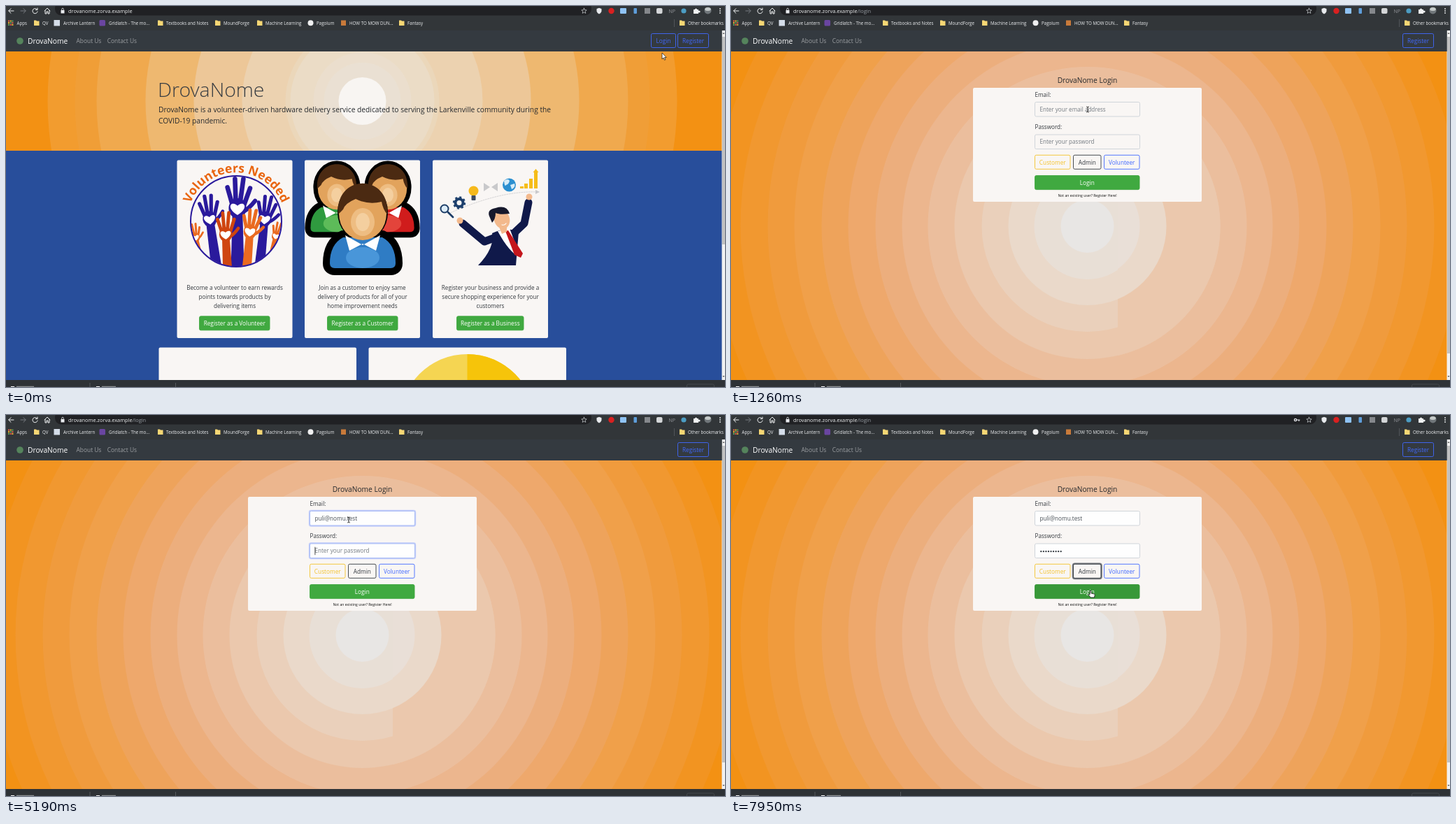
Recreate the animation shown at these times as an HTML page. Size 1028 px wide and 545 px high, loop 8000 ms.

```html
<!DOCTYPE html>
<html lang="en">
<head>
<meta charset="utf-8">
<title>DrovaNome login</title>
<style>
html, body { margin: 0; height: 100%; overflow: hidden; background: #343a40; }
svg { display: block; width: 100vw; height: 100vh; font-family: "Open Sans", "Noto Sans", sans-serif; }
text { white-space: pre; }
</style>
</head>
<body>
<svg id="stage" viewBox="0 0 1028 545"></svg>
<script>
const GREEN = '#40a940', BLUE = '#4169ff', DARK = '#343a40', PAPER = '#f9f6f4', GOLD = '#f3c22b';
const BRAND = 'DrovaNome', HOST = 'drovanome.zorva.example', EMAIL = 'puli@nomu.test';

// Shape helpers
const rect = (x, y, w, h, fill, more = '') => `<rect x="${x}" y="${y}" width="${w}" height="${h}" fill="${fill}" ${more}/>`;
const disc = (x, y, r, fill, more = '') => `<circle cx="${x}" cy="${y}" r="${r}" fill="${fill}" ${more}/>`;
const oval = (x, y, rx, ry, fill, more = '') => `<ellipse cx="${x}" cy="${y}" rx="${rx}" ry="${ry}" fill="${fill}" ${more}/>`;
const path = (d, fill, more = '') => `<path d="${d}" fill="${fill}" ${more}/>`;
const line = (d, color, w = 1, more = '') => path(d, 'none', `stroke="${color}" stroke-width="${w}" stroke-linecap="round" stroke-linejoin="round" ${more}`);
const text = (x, y, s, size, fill, more = '') => `<text x="${x}" y="${y}" font-size="${size}" fill="${fill}" ${more}>${s}</text>`;
const mid = (x, y, s, size, fill, more = '') => text(x, y, s, size, fill, 'text-anchor="middle" ' + more);
const group = (s, more) => `<g ${more}>${s}</g>`;

// Outlined button; fill runs from 0 (outline only) to 1
function button(x, y, w, label, color, fill = 0) {
  return rect(x, y, w, 20, color, `rx="2" stroke="${color}" stroke-width=".9" fill-opacity="${fill}"`) +
    mid(x + w / 2, y + 13.3, label, 8.25, fill > .4 ? '#fff' : color);
}

const rings = (x, y, list) => list.map(([r, c, o = 1]) => disc(x, y, r, c, `opacity="${o}"`)).join('');
const folder = x => path(`M${x} 20.5h3l1 1h3.5v6.5h-7.5z`, '#f7d774');

function toolbar() {
  let s = rect(0, 0, 1028, 35, '#323639') + rect(70, -6, 767, 19.5, '#202124', 'rx="9"');
  s += line('M11 7H4m3-3.3L3.7 7 7 10.3', '#f1f3f4') + line('M21 7h7m-3-3.3L28.3 7 25 10.3', '#777b80');
  s += line('M44.5 5a3.6 3.6 0 1 0 .6 3M45 3v2.5h-2.5', '#f1f3f4') + line('M55 7l4-4 4 4M56 6.5V11h2V8h2v3h2V6.5', '#f1f3f4');
  s += rect(78.5, 6, 5, 4.5, '#e8eaed') + line('M79.7 6V4.5a1.3 1.3 0 0 1 2.6 0V6', '#e8eaed', .8);
  s += line('M826.5 3.2l1.1 2.5 2.6.2-2 1.8.6 2.7-2.3-1.4-2.3 1.4.6-2.7-2-1.8 2.6-.2z', '#d5d8db', .7);
  s += path('M844.5 4l3.5-1.3L851.5 4v3.5q-.5 2.5-3.5 4-3-1.5-3.5-4z', '#e8eaed');
  s += disc(865.5, 7, 4.2, '#d92020') + rect(878, 3, 9, 8, '#8fc3f5', 'rx="1"') + rect(897.5, 3, 4.5, 8, '#5e9edb', 'rx="1"');
  s += rect(913, 3, 8, 8, '#85888c') + rect(930, 3, 8.5, 8, '#d4d6d8', 'rx="2"') + text(947.5, 10, 'NP', 7, '#93969a');
  s += disc(969, 7, 3.6, '#4c9dc4') + path('M983 5h2a1.5 1.5 0 1 1 3 0h2v2a1.5 1.5 0 1 1 0 2v2h-7z', '#f1f3f4');
  s += disc(1003.5, 6.5, 5, '#70767a') + oval(1003.5, 4.5, 4.3, 2.5, '#c5cac9');
  for (const y of [4, 7, 10]) s += disc(1021, y, .9, '#f1f3f4');
  return s;
}

function bookmarks() {
  const marks = [[15.5, 'Apps'], [52, 'QV', 1], [82, 'Archive Lantern'], [147, 'Gridlatch - The mo...'],
    [229, 'Textbooks and Notes', 1], [311, 'MoundForge', 1], [371, 'Machine Learning', 1],
    [444, 'Pagolum'], [491, 'HOW TO MOW DUN...'], [574, 'Fantasy', 1], [975, 'Other bookmarks', 1]];
  let s = '';
  for (let i = 0; i < 9; i++) {
    const row = Math.floor(i / 3);
    s += rect(3 + i % 3 * 2.7, 20.5 + row * 2.7, 2, 2, ['#e85b4d', '#f2b72e', '#5aa65e'][(i + row) % 3]);
  }
  s += rect(68.5, 20, 8.5, 8.5, '#d5dde8') + rect(133.5, 20, 8.5, 8.5, '#6a45a0', 'rx="1.5"');
  s += disc(435.5, 24.3, 4, '#f0f0f0') + rect(479, 20.5, 7, 7.5, '#c97a3a') + rect(955, 19, .7, 11, '#5f6368');
  for (const [x, label, hasFolder] of marks) s += text(x, 26.5, label, 6.2, '#eceef0') + (hasFolder ? folder(x - 12) : '');
  return s;
}

function siteBar() {
  return rect(0, 35, 1023.5, 30, DARK) + disc(20, 50, 4.8, '#55845c') +
    text(31, 53.6, BRAND, 10.2, '#fff', 'font-weight="500"') + text(100.5, 53.2, 'About Us', 8.4, '#9b9ea1') +
    text(144.7, 53.2, 'Contact Us', 8.4, '#9b9ea1') + button(960.5, 39.5, 44, 'Register', BLUE);
}

function shelf() {
  return rect(0, 535, 1028, 10, '#2e3236') + rect(119.5, 539, 1, 6, '#55595d') + rect(242, 539, 1, 6, '#55595d') +
    path('M7 545v-1h5v1zM129 545v-1h5v1z', '#fff') + rect(15, 543.8, 25, 1.2, '#8b8f93') + rect(137, 543.8, 20, 1.2, '#8b8f93') +
    rect(973.5, 541, 39, 9, 'none', 'rx="2" stroke="#44484c"');
}

function scrollbar(end) {
  return rect(1023.5, 35, 4.5, 500, '#f1f1f1') + rect(1024, 44, 4, end - 44, '#c1c1c1') +
    path('M1024.5 40l1.5-2 1.5 2zM1024.5 529l1.5 2 1.5-2z', '#555');
}

function hand(x, y, k, tilt, color) {
  const s = path('M-6 4H6L8 80H-8z', color) + oval(0, 2, 10.5, 12, color) +
    line('M-6 -2L-12 -23M-2 -4L-3 -33M3 -4L7 -33M7 0L15 -22', color, 5.5) + line('M7 6Q14 2 21 -7', color, 5) +
    path('M0 10C-15 1-7-8 0-1 7-8 15 1 0 10z', '#fff');
  return group(s, `transform="translate(${x} ${y}) rotate(${tilt}) scale(${k})"`);
}

function volunteers() {
  const navy = '#2a1a9c', red = '#cf4510', orange = '#ea6a20';
  const hands = [[271, 330, .55, -12, orange], [386, 328, .55, 12, orange], [291, 303, .95, -8, navy], [370, 303, .92, 6, navy],
    [331, 287, 1.2, 0, navy], [314, 325, .88, -3, red], [349, 321, .88, 5, orange]];
  return `<clipPath id="round"><circle cx="329" cy="308" r="64.5"/></clipPath><path id="arc" d="M259 317A70.5 70.5 0 1 1 399 317" fill="none"/>` +
    group(hands.map(h => hand(...h)).join(''), 'clip-path="url(#round)"') +
    disc(329, 308, 65, 'none', `stroke="${navy}" stroke-width="2"`) +
    `<text font-size="17.5" font-weight="700" fill="#e9650f" text-anchor="middle"><textPath href="#arc" startOffset="50%">Volunteers Needed</textPath></text>`;
}

// Bust in local units; rim is the width of the black band around the head
function bust(x, y, k, rim, color, light) {
  const body = 'M-47 72Q-47 45-28 35H28Q47 45 47 72Q47 79 40 79H-40Q-47 79-47 72z';
  const edge = w => `stroke="#000" stroke-width="${2 * w}" stroke-linejoin="round"`;
  const s = path(body, '#000', edge(10)) + oval(0, -1, 35, 40, '#000', edge(rim)) +
    path(body, color) + oval(0, 64, 24, 15, light, 'opacity=".6"') +
    path('M-25 32L0 46 25 32 19 54 0 44-19 54z', '#fff') + oval(0, 1, 34, 38, '#e2a35c') +
    oval(0, 13, 17, 20, '#eebd82') + oval(0, 13, 10, 13, '#f4cf9f') +
    path('M-35 2C-40-57 40-57 35 2Q29-5 27-16Q8-11-10-20Q-25-14-28-5z', '#4b2a12');
  return group(s, `transform="translate(${x} ${y}) scale(${k})"`);
}

function customers() {
  return '<clipPath id="photo"><path d="M427 220h165v165h-165z"/></clipPath>' +
    group(bust(473, 260, .8, 7, '#2f9a3f', '#7cd36c') + bust(546, 260, .8, 7, '#d01c1c', '#f06050') +
      bust(510, 296, 1, 1, '#2f7cc4', '#5aa8e8'), 'clip-path="url(#photo)"');
}

function business() {
  const suit = '#10194a', skin = '#f3b98c';
  let s = line('M633 297Q705 264 760 266', '#c9c9cc', .8, 'stroke-dasharray="2 1.5"') + path('M757 263l6 3-6 3z', '#c9c9cc');
  s += disc(627, 290, 5.5, '#dcecf8', 'stroke="#1c3c66" stroke-width="2"') + line('M632 295l7 7', '#1c3c66', 2.8);
  s += disc(648, 281.5, 5.5, 'none', 'stroke="#1d3f6c" stroke-width="4"') + disc(648, 281.5, 8, 'none', 'stroke="#1d3f6c" stroke-width="2.4" stroke-dasharray="3 3.28"');
  s += disc(668.5, 264.5, 7, '#f6b91c') + rect(665.5, 271, 6, 7, '#3b4961', 'rx="1"');
  s += path('M683 253l9 6-9 6zM703 253l-9 6 9 6z', '#c9c9cb');
  s += disc(719.5, 256, 9.5, '#2b8fd0') + path('M712 250q6-4 8 0-1 5-5 6-2 4-3-6zM721 256l6-2q2 5-4 8z', '#d6ecf8');
  for (const [x, h] of [[735, 3], [741, 7], [748, 14], [755, 24]]) s += rect(x, 261 - h, 5, h, '#f5bd18');
  s += path('M753.5 238l4-5 4 5z', '#f5bd18');
  s += line('M716 325L684 337 653 311', suit, 11, 'stroke-linecap="butt"') + line('M724 327L741 311 747 281', suit, 11);
  s += disc(649, 307, 4.5, skin) + disc(748, 273, 4.5, skin);
  s += path('M695 325Q715 315 733 323L729 371H675Q699 346 695 325z', suit) + path('M703 322l17-4 16 43q-17-9-33-39z', '#fff');
  s += path('M714 322l4-1 21 33-3 6-9-4z', '#c4161c');
  s += path('M703 311h13v12l-7 3z', skin) + oval(709, 305, 11, 14, skin, 'transform="rotate(-18 709 305)"');
  s += path('M692 303Q686 291 700 289Q716 284 720 297Q706 299 700 296Q700 305 695 310z', '#16182c') + line('M709 313q4 1 6-2', '#fff', 1.2);
  return s;
}

function home() {
  const cards = [
    [244.5, volunteers, 276.5, 100.5, 'Volunteer', ['Become a volunteer to earn rewards', 'points towards products by', 'delivering items']],
    [427, customers, 459.5, 100.5, 'Customer', ['Join as a customer to enjoy same', 'delivery of products for all of your', 'home improvement needs']],
    [610, business, 644.5, 95.5, 'Business', ['Register your business and provide a', 'secure shopping experience for your', 'customers']]];
  let s = rect(0, 65, 1024, 142, '#f39113') + '<clipPath id="hero"><path d="M0 65h1024v142H0z"/></clipPath>';
  s += group(rings(509.5, 136, [[450, '#f29c2f'], [411, '#f1a03c', .6], [380, '#f0a94e'], [310, '#eeb870'],
    [241, '#edc798'], [172, '#ecd2b0'], [110, '#ebdac2', .6], [103, '#ebdcc6'], [70, '#ebe0d0', .7], [55, '#eae3d7', .6], [34, '#f8f5f2']]), 'clip-path="url(#hero)"');
  s += text(217, 130, BRAND, 28.4, '#383d42', 'font-weight="300"');
  s += text(218, 152.4, BRAND + ' is a volunteer-driven hardware delivery service dedicated to serving the Larkenville community during the', 10.22, '#25292d');
  s += text(218, 168.4, 'COVID-19 pandemic.', 10.22, '#25292d') + rect(0, 207, 1024, 328, '#284e9b');
  for (const [x, art, bx, bw, kind, lines] of cards) {
    s += rect(x, 220.5, 165, 254.5, PAPER, 'rx="2"') + art();
    lines.forEach((l, i) => s += mid(x + 82.5, 405.5 + 13 * i, l, 8.15, '#33383d'));
    s += button(bx, 443.8, bw, 'Register as a ' + kind, GREEN, 1);
  }
  s += rect(218.5, 488.5, 282.5, 60, PAPER, 'rx="2"') + rect(518.5, 488.5, 282.5, 60, PAPER, 'rx="2"');
  return s + disc(659.5, 594.5, 96.5, '#f5d552') + path('M659.5 498a96.5 96.5 0 0 1 0 193z', '#f6c40a') + scrollbar(341);
}

const coarse = [[496, '#f19830'], [419, '#f0a04a'], [342, '#eea86c'], [265, '#ecb68e'], [190, '#ebc8ad'], [113, '#ead9ca'], [38, '#e8e6e4']];
const soft = [[427, '#f0a04a', .5], [388, '#eea86c', .4], [196, '#ebc8ad', .4], [55, '#e8e1dc', .7]];
const byRadius = list => list.sort((a, b) => b[0] - a[0]);

// Early backdrop has wide bands; the settled one adds a half-tone band between each pair
function backdrop(settled) {
  const base = rect(0, 65, 1024, 470, '#f39113');
  if (!settled) return base + rings(509.5, 315, byRadius([...coarse, ...soft]));
  const fine = coarse.flatMap(([r, c]) => [[r + 38, c, .5], [r, c]]);
  return base + rings(509.5, 315, fine) + '<clipPath id="side"><path d="M553 65h471v470H553z"/></clipPath>' +
    group(rings(509.5, 315, [...coarse.slice(4, 6), [75, '#e9dfd7']]), 'clip-path="url(#side)"');
}

function form() {
  return rect(346, 117, 327, 163, PAPER, 'rx="2"') + mid(509.5, 110, BRAND + ' Login', 10.2, '#25292d', 'font-weight="500"') +
    text(434.5, 129.8, 'Email:', 8.15, '#33383d') + text(434.5, 176.2, 'Password:', 8.15, '#33383d') +
    mid(509.5, 273.2, 'Not an existing user? Register Here!', 5.1, '#111') + scrollbar(497);
}

// Time-driven parts
const emailKeys = [2280, 2570, 2830, 3140, 3540, 3670, 3810, 3940, 4080, 4210, 4350, 4480, 4630, 4630];
const passKeys = [5460, 5600, 5740, 5880, 6040, 6310, 6450, 6590, 6590];
const moves = [[0, 'arrow', 938, 67], [150, 'hand', 941, 58], [280, 'hand', 942, 54], [560, 'arrow', 941.5, 53.5],
  [700, 'arrow', 932, 59], [840, 'arrow', 860, 85], [980, 'arrow', 720, 120], [1120, 'arrow', 590, 142],
  [1260, 'beam', 510, 148], [1400, 'beam', 490, 150], [7020, 'arrow', 499, 172], [7160, 'hand', 511, 215],
  [7290, 'hand', 518, 223], [7690, 'arrow', 517, 238], [7820, 'hand', 514, 249], [7950, 'hand', 514, 251]];
const shapes = {
  arrow: path('M0 0v9l2-1.9 1.5 3.2 1.4-.6-1.5-3.1h2.8z', '#fff', 'stroke="#111" stroke-width=".7"'),
  hand: path('M-.9.5q.9-1.2 1.8 0v3.5l4.4 1q1 .3.9 1.5l-.7 3.5H0L-3 6q0-1.4 2.1-.2z', '#fff', 'stroke="#111" stroke-width=".8"'),
  beam: line('M-1.5-4Q0-4 0-3V3Q0 4 1.5 4M1.5-4Q0-4 0-3M0 3Q0 4-1.5 4', '#111', .8)
};
const pen = document.createElement('canvas').getContext('2d');
const typed = (keys, t) => keys.filter(k => k <= t).length;
// Half way at a, complete at b
const fade = (t, a, b) => t < a ? 0 : t < b ? .5 : 1;

function field(y, value, hint, focus, caret, width) {
  const glow = focus ? rect(433.7, y - .8, 151.6, 22.1, 'none', `rx="2.5" stroke="#8aa4ff" stroke-width="1.8" opacity="${focus}"`) : '';
  return glow + rect(434.5, y, 150, 20.5, value || focus ? '#fefefe' : PAPER, `rx="2" stroke="${focus ? '#a9bcf5' : '#d0d5da'}"`) +
    (value || text(441.5, y + 13.4, hint, 8.1, '#737a81')) +
    (caret ? rect(441.5 + width, y + 4.7, .8, 11.5, '#222') : '');
}

function loginState(t) {
  const n = typed(emailKeys, t), m = typed(passKeys, t), mail = EMAIL.slice(0, n);
  pen.font = '8.2px "Open Sans", "Noto Sans", sans-serif';
  const mailFocus = fade(t, 1400, 1540) - fade(t, 5190, 5320);
  const passFocus = fade(t, 5190, 5320) - fade(t, 7560, 7690);
  const adminFill = fade(t, 7160, 7290) - fade(t, 7690, 7820);
  let dots = '';
  for (let i = 0; i < m; i++) dots += disc(443.3 + 3.55 * i, 195.2, 1.15, '#333a40');
  let s = field(137.5, n && text(441.5, 150.9, mail, 8.2, '#495057'), 'Enter your email address', mailFocus,
    t >= 1540 && t < 5190 && (t < 2010 || t >= 2280), pen.measureText(mail).width);
  s += field(184, dots, 'Enter your password', passFocus, t >= 5190 && t < 7020, m * 3.55);
  s += button(434.5, 213.3, 50.5, 'Customer', GOLD);
  if (t >= 7560) s += rect(488.7, 212.4, 41.1, 21.8, 'none', 'rx="3" stroke="#777b80" stroke-width="2"');
  s += button(489.5, 213.3, 39.5, 'Admin', DARK, adminFill) + button(533.5, 213.3, 50.5, 'Volunteer', BLUE);
  s += button(434.5, 242.6, 149.5, 'Login', t < 7820 ? GREEN : t < 7950 ? '#3ca13c' : '#389838', 1);
  if (t < 840) s += group(rect(-2, 524, 119, 11, '#35363a', 'rx="1.5" opacity=".75"') +
    text(-2.5, 532, `https://${HOST}/login`, 6.4, '#d5d5d5'), `opacity="${1 - fade(t, 700, 840)}"`);
  if (t >= 5320) s += disc(807, 7, 1.6, 'none', 'stroke="#e8eaed" stroke-width="1.3"') + line('M809 7h4M812 7v1.5', '#e8eaed', 1.2);
  return s;
}

function live(t) {
  const [, kind, x, y] = moves.filter(m => m[0] <= t).pop();
  const page = t < 560 ? button(922.5, 39.5, 35, 'Login', BLUE, fade(t, 150, 280)) : loginState(t);
  return text(89, 9.6, HOST + (t < 560 ? '' : '<tspan fill="#9aa0a6">/login</tspan>'), 7.4, '#f1f3f4') + page +
    group(shapes[kind], `transform="translate(${x} ${y})"`);
}

const part = id => document.getElementById(id);
const show = (id, on) => part(id).style.display = on ? '' : 'none';
part('stage').innerHTML = group(home(), 'id="home"') + group(backdrop(false), 'id="early"') + group(backdrop(true), 'id="late"') +
  group(form(), 'id="form"') + toolbar() + bookmarks() + siteBar() + shelf() + '<g id="live"></g>';
let start, last;

function frame(now) {
  start ??= now;
  const t = Math.max(0, now - start) % 8000, next = live(t);
  if (next !== last) {
    part('live').innerHTML = last = next;
    show('home', t < 560);
    show('early', t >= 560 && t < 700);
    show('late', t >= 700);
    show('form', t >= 560);
  }
  requestAnimationFrame(frame);
}
frame(performance.now());
</script>
</body>
</html>
```
